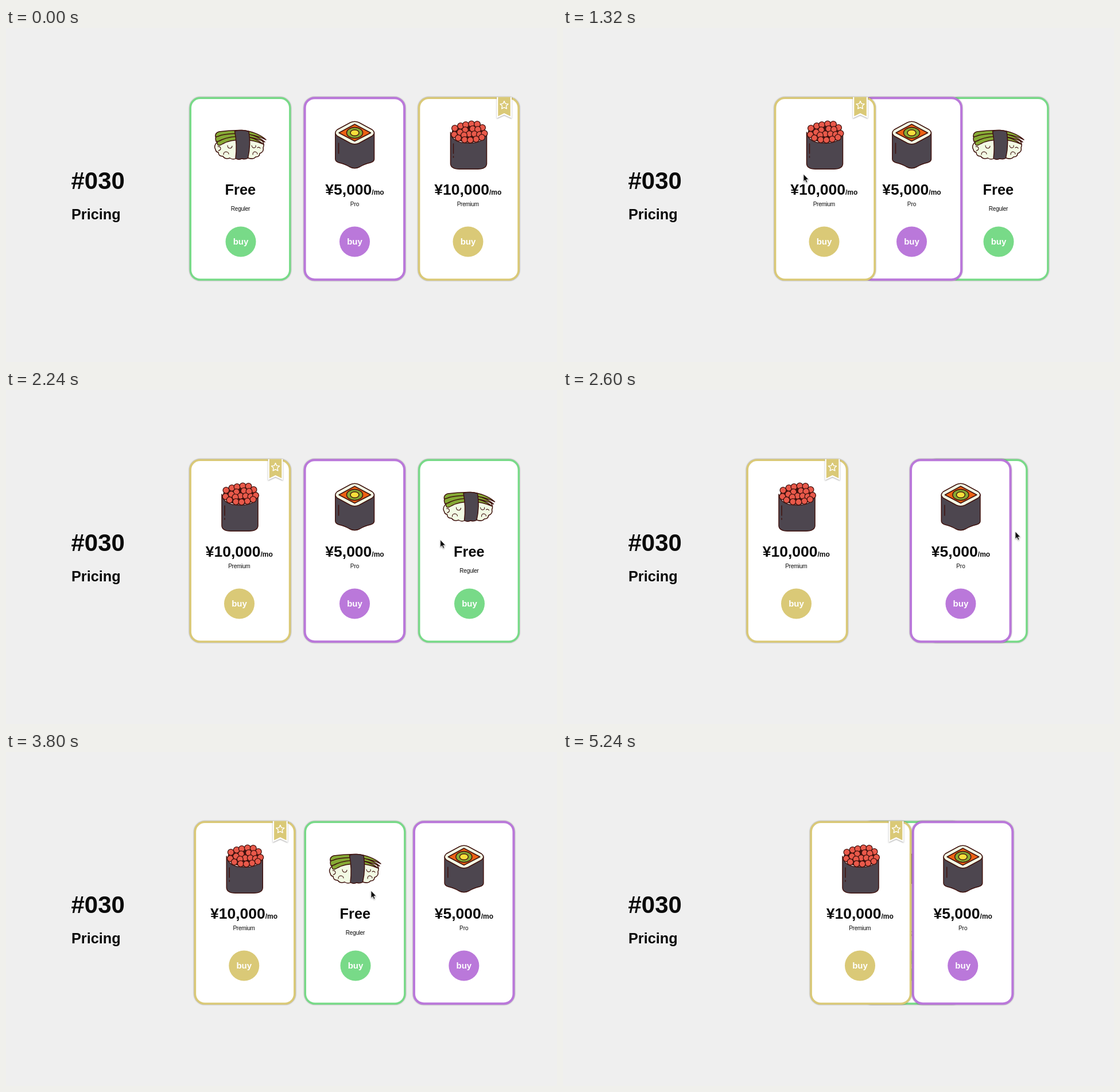
Write an HTML page that moves like this. It is 960x583 px and loops after 6200 ms.

```html
<!DOCTYPE html>
<html lang="en">
<head>
<meta charset="utf-8">
<title>Pricing</title>
<style>
html, body { margin: 0; height: 100%; overflow: hidden; background: #efefef; }
svg { display: block; width: 100vw; height: 100vh; font-family: "Liberation Sans", Arial, sans-serif; }
text { fill: #0b0b0b; }
.card text { text-anchor: middle; }
.bold { font-weight: 700; }
.frame { fill: #fff; filter: drop-shadow(0 .5px 1px rgba(0,0,0,.4)); }
.art { stroke: #40130f; stroke-width: 1.5; stroke-linejoin: round; stroke-linecap: round; }
.nori { fill: #4d464f; }
.rice { fill: #f2fae4; }
.leaf { fill: #86aa35; }
.line { fill: none; }
</style>
</head>
<body>
<svg viewBox="0 0 960 583">
  <text class="bold" x="113.5" y="280.5" font-size="42">#030</text>
  <text class="bold" x="114" y="334" font-size="25.3">Pricing</text>

  <g id="green" class="card">
    <g class="art">
      <path class="rice" d="M368 199Q361 206 365 212Q366 217 370 217Q370 224 378 224Q382 230 390 227Q396 231 402 227H422Q431 230 435 225Q442 225 442 219Q450 216 448 209Q451 203 446 196L408 185Z"/>
      <path class="line" stroke-width="1.1" d="M369 207q5-1 5 4q-1 3-4 3M386 205q0 5 5 5q3-1 3-4M379 221q0-5 5-5q4 1 4 4M428 205q1 5 5 4q3-1 2-4M430 221q0-5 4-5q4 1 4 4M438 209q3-2 5 1"/>
      <path class="leaf" d="M369 204Q366 198 371 196Q387 188 410 188Q434 191 449 203Q431 195 412 195Q390 195 378 202Q372 206 369 204Z"/>
      <path class="leaf" d="M366 198Q363 190 369 188Q386 183 410 183Q436 186 451 199Q432 190 411 189Q390 189 376 195Q369 199 366 198Z"/>
      <path class="leaf" d="M365 190Q364 183 371 181Q390 178 412 178.500Q437 181 453 195Q434 186 411 184Q388 184 375 187Q368 190 365 190Z"/>
      <path class="nori" d="M398.500 180Q411 177 423 180.500Q427 203 421.500 227Q417 230 411 228Q405 231 400 227.500Q403 204 398.500 180Z"/>
    </g>
    <text class="bold" x="408.300" y="291" font-size="25.3">Free</text>
    <text x="408.500" y="319" font-size="10" letter-spacing="-.25">Reguler</text>
  </g>

  <g id="purple" class="card">
    <g class="art">
      <path class="nori" d="M573.800 183V229Q574 233 580 235Q592 238 598 242Q607.500 247.500 617 242Q623 238 635 235Q641.500 233 641.500 229V183Z"/>
      <path class="rice" d="M577 177.500L600 165Q607.500 161.500 615 165L638 177.500Q645 183 638 188.500L615 201Q607.500 204.500 600 201L577 188.500Q570.500 183 577 177.500Z"/>
      <path fill="#ec6214" d="M580 183L607.500 168L635.500 183L607.500 197.500Z"/>
      <ellipse class="leaf" cx="607.500" cy="183" rx="14" ry="9.500"/>
      <ellipse fill="#f5df3c" cx="607.500" cy="183" rx="7.500" ry="5.300"/>
      <path class="line" d="M579.500 201V219"/>
    </g>
    <text class="bold" x="607.500" y="291" font-size="26.5">¥5,000<tspan font-size="12">/mo</tspan></text>
    <text x="607.500" y="310.500" font-size="10">Pro</text>
  </g>

  <g id="gold" class="card">
    <path fill="#fff" style="filter:drop-shadow(0 1px 1px rgba(0,0,0,.35))" d="M855 120.500H881V157.500L868 151.500L855 157.500Z"/>
    <path fill="#dac977" d="M857.300 120.500H878.800V154L868 148.800L857.300 154Z"/>
    <path id="star" fill="none" stroke="#fff" stroke-width="1.4" stroke-linejoin="round"/>
    <g class="art">
      <path class="nori" d="M774.500 182V237Q775 246 790 246.200H822Q837 246 837.500 237V182Q835 201 806 201Q777 201 774.500 182Z"/>
      <ellipse fill="#40130f" cx="806.500" cy="183" rx="29" ry="16"/>
      <g id="roe" fill="#e9594a" stroke-width="1.3"></g>
      <path class="line" d="M779.500 202V219M779.500 224V226"/>
    </g>
    <text class="bold" x="804.800" y="291" font-size="26.5">¥10,000<tspan font-size="12">/mo</tspan></text>
    <text x="804.800" y="310.500" font-size="10" letter-spacing="-.25">Premium</text>
  </g>

  <path id="cursor" fill="#0b0b0b" stroke="#fff" stroke-width=".8" style="filter:drop-shadow(0 1px 1px rgba(0,0,0,.35))"
    d="M0 0V13L2.900 10.400L5 15L7 14.100L5 9.600H9Z"/>
</svg>
<script>
const $ = id => document.getElementById(id);
const NS = "http://www.w3.org/2000/svg";
const make = (tag, attrs) => {
  const el = document.createElementNS(NS, tag);
  for (const k in attrs) el.setAttribute(k, attrs[k]);
  return el;
};

// Frame and button shared by every card
function dress(id, x, buttonX, color, weight) {
  const g = $(id);
  g.prepend(make("rect", { class: "frame", x: x - 86.700, y: 122.200, width: 173.500, height: 317, rx: 17, stroke: color, "stroke-width": weight }));
  g.append(make("circle", { cx: buttonX, cy: 373, r: 26.500, fill: color }));
  const label = make("text", { class: "bold", x: buttonX, y: 378, "font-size": 15, style: "fill:#fff" });
  label.textContent = "buy";
  g.append(label);
}
dress("green", 408, 409, "#78da88", 3.400);
dress("purple", 607.300, 607.500, "#ba78da", 4);
dress("gold", 806.300, 805, "#dac977", 3.600);

const roe = [[792, 171], [801, 169], [811, 167.500], [821, 168], [782, 175], [830, 174], [800, 178], [813, 176], [822, 177],
  [791, 182], [781, 186], [807, 185], [816, 185], [825, 186], [833.500, 184], [798, 187], [788, 192], [829, 191], [799, 195], [819, 194], [809, 195.500]];
for (const [cx, cy] of roe) $("roe").append(make("circle", { cx, cy, r: 5.400 }));

const star = Array.from({ length: 10 }, (_, i) => {
  const r = i % 2 ? 3.600 : 7.400, a = i * Math.PI / 5;
  return `${868 + r * Math.sin(a)} ${135 - r * Math.cos(a)}`;
});
$("star").setAttribute("d", `M${star.join("L")}Z`);

const clamp = u => Math.max(0, Math.min(1, u));
const mix = (a, b, u) => a + (b - a) * u;
const smooth = u => u * u * (3 - 2 * u);

// CSS "ease": cubic-bezier(.25, .1, .25, 1)
function ease(u) {
  let lo = 0, hi = 1;
  for (let i = 0; i < 24; i++) {
    const s = (lo + hi) / 2;
    if (.75 * s * (1 - s) + s ** 3 < u) lo = s; else hi = s;
  }
  const s = (lo + hi) / 2, r = 1 - s;
  return .3 * s * r * r + 3 * s * s * r + s ** 3;
}
const slide = (t, start) => ease(clamp((t - start) / 500));

// start, end, from, to, vertical sway
const moves = [
  [480, 1040, [700, 28], [419, 255], 0],
  [1690, 2360, [419, 255], [788, 247], -27],
  [3060, 3720, [788, 247], [636, 242], 0],
  [4850, 5230, [636, 242], [842, 0], 0]
];

function pointer(t) {
  const [start, end, a, b, sway] = moves.findLast(m => t >= m[0]) || moves[0];
  const u = smooth(clamp((t - start) / (end - start)));
  return [mix(a[0], b[0], u), mix(a[1], b[1], u) + sway * Math.sin(2 * Math.PI * u)];
}

const place = (id, x, y = 0) => $(id).setAttribute("transform", `translate(${x} ${y})`);

function draw(now) {
  const t = Math.floor(now % 6200 / 40) * 40;
  const outer = slide(t, 1025), right = slide(t, 2470), stack = slide(t, 3757);
  place("green", 398.500 * outer - 198.500 * right);
  place("purple", 198.500 * right - 109.300 * stack);
  place("gold", -398.500 * outer + 111 * stack);
  place("cursor", ...pointer(t));
  $("cursor").style.display = t >= 480 && t < 5240 ? "" : "none";
}

let origin;
function tick(now) {
  origin ??= now;
  draw(now - origin);
  requestAnimationFrame(tick);
}
draw(0);
requestAnimationFrame(tick);
</script>
</body>
</html>
```
